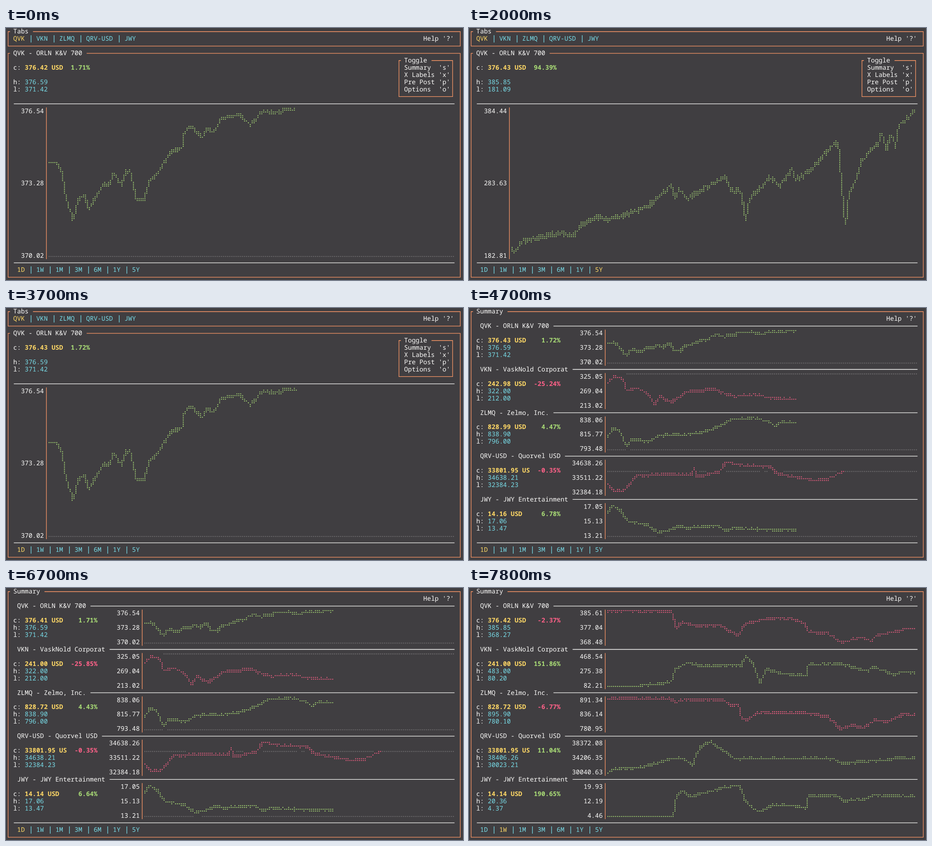
Recreate the animation shown at these times as an HTML page. Size 1007 by 556 pixels, loop 8000 ms.

```html
<!DOCTYPE html>
<html lang="en">
<head>
<meta charset="utf-8">
<title>Terminal ticker</title>
<style>
  html, body { margin: 0; width: 100%; height: 100%; overflow: hidden; background: #403e41; }
  svg { display: block; width: 100%; height: 100%; }
  text { font: 14.07px "Noto Sans Mono", "DejaVu Sans Mono", monospace; text-rendering: geometricPrecision; }
  .bold { font-weight: 700; }
  path { fill: none; stroke-width: 1.3; }
  .dots { stroke-width: 2.3; stroke-linecap: round; }
</style>
</head>
<body>
<svg id="stage" viewBox="0 0 1007 556" preserveAspectRatio="none"></svg>
<script>
const LOOP = 8000, CELL_W = 8.444, CELL_H = 15.94;
const C = { white: '#fcfcfa', orange: '#fc9867', yellow: '#ffd866', green: '#a9dc76',
            cyan: '#78dce8', red: '#ff6188', gray: '#727072' };
const RANGES = ['1D', '1W', '1M', '3M', '6M', '1Y', '5Y'];
const TICKERS = ['QVK', 'VKN', 'ZLMQ', 'QRV-USD', 'JWY'];
const NAMES = ['ORLN K&V 700', 'VaskNold Corporat', 'Zelmo, Inc.', 'Quorvel USD', 'JWY Entertainment'];
const TITLES = TICKERS.map((t, i) => `${t} - ${NAMES[i]}`);

const colX = c => c * CELL_W + 0.38;
const midX = c => colX(c + 0.5);
const rowY = r => 8 + r * CELL_H;
const trend = pct => pct.startsWith('-') ? C.red : C.green;

let layer;
function add(tag, attrs, parent = layer) {
  const el = document.createElementNS('http://www.w3.org/2000/svg', tag);
  for (const k in attrs) el.setAttribute(k, attrs[k]);
  return parent.appendChild(el);
}
function text(col, row, str, color = C.white, bold = false) {
  add('text', { x: colX(col) - 1.25, y: rowY(row) + 4.4, fill: color, class: bold ? 'bold' : '' }).textContent = str;
}
const line = (d, color) => add('path', { d, stroke: color });
const rule = (row, from) => line(`M${colX(from)} ${rowY(row)}H${colX(117)}`, C.white);
const bar = (col, top, bottom, color) =>
  line(`M${midX(col)} ${rowY(top - 0.5)}V${rowY(bottom + 0.5)}`, color);

function frame(left, top, right, bottom, title) {
  text(left + 2, top, title);
  line(`M${colX(left + 1)} ${rowY(top)}H${midX(left)}V${rowY(bottom)}H${midX(right)}V${rowY(top)}` +
       `H${colX(left + 3 + title.length)}`, C.orange);
}
function tabs(col, row, items, active) {
  items.forEach((item, i) => {
    if (i) bar(col - 2, row, row, C.cyan);
    text(col, row, item, item === active ? C.yellow : C.cyan);
    col += item.length + 3;
  });
}

const noise = n => { const v = Math.sin(n * 12.9898) * 43758.5453; return v - Math.floor(v) - 0.5; };

// Key points are x, y pairs in percent of the plot, y counted from its top.
// Level stretches stay calm; sloping ones get noise.
function curve(pts, x) {
  let i = 2;
  while (i < pts.length - 2 && pts[i] < x) i += 2;
  const [x0, y0, x1, y1] = pts.slice(i - 2, i + 2);
  const t = Math.max(0, Math.min(1, (x - x0) / (x1 - x0)));
  return { y: y0 + (y1 - y0) * t, calm: y0 === y1 };
}

// Braille plot: each text cell holds 2 by 4 dots, and each column spans three samples.
function plot(col, top, bottom, { pts, span, ref, rough = 1.1 }, color) {
  const width = (117 - col) * 2, height = (bottom - top + 1) * 4 - 2;
  const used = new Set();
  const cell = (c, r) => `${c >> 1},${r >> 2}`;
  const dot = (c, r) =>
    `M${(colX(col) + 1.75 + c * CELL_W / 2).toFixed(1)} ${(rowY(top) - 6 + r * CELL_H / 4).toFixed(1)}h0`;
  const level = s => {
    const { y, calm } = curve(pts, s / 3 / width * 100);
    const r = y * height / 100 + (calm ? 0 : rough * noise(s + pts.length));
    return Math.max(0, Math.min(height, Math.round(r)));
  };
  let d = '', lastLow, lastHigh;
  for (let c = 0; c < Math.round(width * span / 100); c++) {
    const samples = [-1, 0, 1].map(k => level(c * 3 + k));
    const low = Math.min(...samples, (lastHigh ?? height) + 1);
    const high = Math.max(...samples, (lastLow ?? 0) - 1);
    for (let r = low; r <= high; r++) {
      d += dot(c, r);
      used.add(cell(c, r));
    }
    lastLow = Math.min(...samples);
    lastHigh = Math.max(...samples);
  }
  add('path', { d, stroke: color, class: 'dots' });
  if (ref === undefined) return;
  const refRow = Math.round(ref * height / 100);
  d = '';
  for (let c = 0; c < width; c++) if (!used.has(cell(c, refRow))) d += dot(c, refRow);
  add('path', { d, stroke: C.gray, class: 'dots' });
}

function quote(row, gap, price = '', pct = '', pctCol = 0, hi = '', lo = '') {
  ['c:', 'h:', 'l:'].forEach((k, i) => text(2, row + i + (i ? gap : 0), k));
  text(5, row, price, C.yellow, true);
  text(pctCol, row, pct, trend(pct), true);
  text(5, row + gap + 1, hi, C.cyan);
  text(5, row + gap + 2, lo, C.cyan);
}
function axis(col, top, bottom, labels) {
  bar(col, top, bottom, C.orange);
  labels.forEach((s, i) => text(col - s.length, top + (bottom - top) * i / 2, s));
}

function single(range, data, price, pct) {
  frame(0, 0, 118, 2, 'Tabs');
  tabs(2, 1, TICKERS, TICKERS[0]);
  text(109, 1, "Help '?'");
  frame(0, 3, 118, 34, TITLES[0]);
  quote(5, 1, price + ' USD', pct, 17, data.hi, data.lo);
  frame(102, 4, 116, 9, 'Toggle');
  ['Summary', 'X Labels', 'Pre Post', 'Options'].forEach((s, i) => {
    text(104, 5 + i, s);
    text(113, 5 + i, `'${s[0].toLowerCase()}'`);
  });
  rule(10, 2);
  axis(10, 11, 31, data.axis);
  plot(11, 11, 31, data, trend(pct));
  rule(32, 2);
  tabs(3, 33, RANGES, range);
}

function summary(range, rows, quotes) {
  frame(0, 0, 118, 34, 'Summary');
  text(109, 1, "Help '?'");
  TITLES.forEach((title, i) => {
    const top = 2 + 6 * i, data = rows[i], ready = i < quotes.length;
    text(3, top, title);
    rule(top, title.length + (ready ? 4 : 8));
    if (!ready) {
      quote(top + 2, 0);
      axis(34, top + 1, top + 5, []);
      return;
    }
    const [price, pct] = quotes[i];
    quote(top + 2, 0, (price + ' USD').slice(0, 11), pct, 24 - pct.length, data.hi, data.lo);
    axis(35, top + 1, top + 5, data.axis);
    plot(36, top + 1, top + 5, data, trend(pct));
  });
  rule(32, 2);
  tabs(3, 33, RANGES, range);
}

const stock = (hi, lo, axis, span, ref, pts) => ({ hi, lo, axis: axis.split(' '), span, ref, pts });

const day = [
  stock('376.59', '371.42', '376.54 373.28 370.02', 60.9, 100,
    [0,37, 2,37, 3.2,44, 4,58, 6,76, 7,63, 8.6,58, 9.8,68, 13,52, 15,51, 16,43, 17.8,52, 18.8,43, 20,42, 21.5,62,
     23.5,61, 24.4,50, 27,43, 30,29, 32.7,27, 33.2,17, 35,12, 37.8,20, 38.6,14, 41,15, 42,7, 46.7,4, 49.7,11, 52.5,2, 56.4,3, 59,0, 61,1]),
  stock('322.00', '212.00', '325.05 269.04 213.02', 60.9, 0,
    [0,26, 2,6, 5,15, 6,52, 9.5,45, 13,60, 15,96, 16.5,68, 20.5,88, 25.5,55, 34,47, 41,70, 47,62, 52,73, 60,78]),
  stock('838.90', '796.00', '838.06 815.77 793.48', 60.9, 100,
    [0,60, 1.5,32, 4,46, 6,92, 7.5,70, 14,74, 16,56, 27,52, 33,40, 37,22, 40,6, 47,2, 51,12, 54,26, 56,14, 61,17]),
  stock('34638.21', '32384.23', '34638.26 33511.22 32384.18', 76.5, 33,
    [0,72, 2,94, 5.5,93, 9,48, 16,42, 27,43, 27.8,18, 28.5,50, 36,34, 38,4, 43,14, 53,20, 54,38, 58,45, 67,62, 71,56, 76,33]),
  stock('17.06', '13.47', '17.05 15.13 13.21', 60.9, 100,
    [0,28, 1.5,3, 4,20, 6.5,55, 13,66, 16,88, 20,80, 23,66, 25,74, 35,66, 38,80, 41,74, 53,80, 61,78])
];

const week = [
  stock('385.85', '368.27', '385.61 377.04 368.48', 99.4, undefined,
    [0,1, 20.5,2, 22,52, 24,36, 28,46, 36,45, 42,78, 44,42, 52,24, 59,23, 63.5,40, 64.5,65, 71,70, 75,98, 82,82, 85,93, 87,74, 94,62, 96,56, 100,56]),
  stock('483.00', '80.20', '468.54 275.38 82.21', 99.4, undefined,
    [0,100, 9.5,100, 11,95, 16,94, 20.5,84, 21.5,48, 26,26, 30,38, 43,34, 44.5,4, 47,35, 49,90, 51,46, 56,60, 64,66,
     64.5,33, 75,30, 80,45, 84,52, 85.5,38, 92,64, 95,54, 100,58]),
  stock('895.90', '780.10', '891.34 836.14 780.95', 99.4, undefined,
    [0,4, 20,5, 21.5,14, 24,8, 37,7, 40,26, 42,22, 43,62, 45,70, 48,48, 62,46, 71,60, 75,98, 79,84, 82,96, 86,70, 90,75, 95,52, 100,56]),
  stock('38406.26', '30023.21', '38372.08 34206.35 30040.63', 99.4, undefined,
    [0,98, 2.3,88, 8,86, 14,75, 20,56, 24,55, 27.5,75, 28.5,40, 30,18, 33,3, 36,22, 41,57, 44,55, 64,54, 72,56, 76,70, 85,62, 90,60, 93,52, 100,56]),
  stock('20.36', '4.37', '19.93 12.19 4.46', 99.4, undefined,
    [0,100, 21,100, 22,40, 24,20, 26.5,38, 31,28, 38,10, 42.5,5, 44,50, 47,77, 49,86, 53,64, 60,66, 64,75, 64.5,36,
     74,37, 76,52, 83,45, 86,32, 88,35, 100,38])
];

const fiveYears = { rough: 3.2, ...stock('385.85', '181.09', '384.44 283.63 182.81', 99.5, undefined,
  [0,96, 0.5,99, 2,90, 12,84, 15,86, 17,79, 21,73, 23.5,75, 31,69, 34.4,64, 38.2,54, 39.1,50, 40,60, 41,54, 43,61,
   48,53, 52.7,46, 53.6,55, 56.4,56, 57.4,74, 58.5,61, 63.6,46, 65.9,52, 68.8,41, 69.8,48, 72.7,44, 78.3,27, 80.2,22,
   82,80, 83,56, 84.9,48, 86.2,34, 90,24, 91,15, 92,29, 93.4,17, 94.3,26, 95.2,12, 99,1, 99.5,4]) };

const dayView = { ...day[0], rough: 2 };
const dayViewLater = { ...dayView, span: 61.3 };

const coin = ['33801.95', '-0.35%'];
const opening = [['376.43', '1.72%'], ['242.98', '-25.24%'], ['828.99', '4.47%'], coin, ['14.16', '6.78%']];
const updated = [['376.41', '1.71%'], ['241.00', '-25.85%'], ['828.72', '4.43%'], coin];
const weekly = [['376.42', '-2.37%'], ['241.00', '151.86%'], ['828.72', '-6.77%'], ['33801.95', '11.04%'], ['14.14', '190.65%']];

const scenes = [
  [0, () => single('1D', dayView, '376.42', '1.71%')],
  [1500, () => single('5Y', fiveYears, '376.42', '94.38%')],
  [2000, () => single('5Y', fiveYears, '376.43', '94.39%')],
  [3200, () => single('1D', dayView, '376.43', '1.72%')],
  [3700, () => single('1D', dayViewLater, '376.43', '1.72%')],
  [4700, () => summary('1D', day, opening)],
  [6200, () => summary('1D', day, [...updated, opening[4]])],
  [6700, () => summary('1D', day, [...updated, ['14.14', '6.64%']])],
  [7200, () => summary('1W', week, weekly.slice(0, 1))],
  [7800, () => summary('1W', week, weekly)]
];

const stage = document.getElementById('stage');
const layers = scenes.map(([, draw]) => {
  layer = add('g', { visibility: 'hidden' }, stage);
  draw();
  return layer;
});
let shown = -1;
function tick() {
  const t = performance.now() % LOOP;
  const now = scenes.findLastIndex(([start]) => start <= t);
  if (now !== shown) {
    layers.forEach((g, i) => g.setAttribute('visibility', i === now ? 'visible' : 'hidden'));
    shown = now;
  }
  requestAnimationFrame(tick);
}
tick();
</script>
</body>
</html>
```
